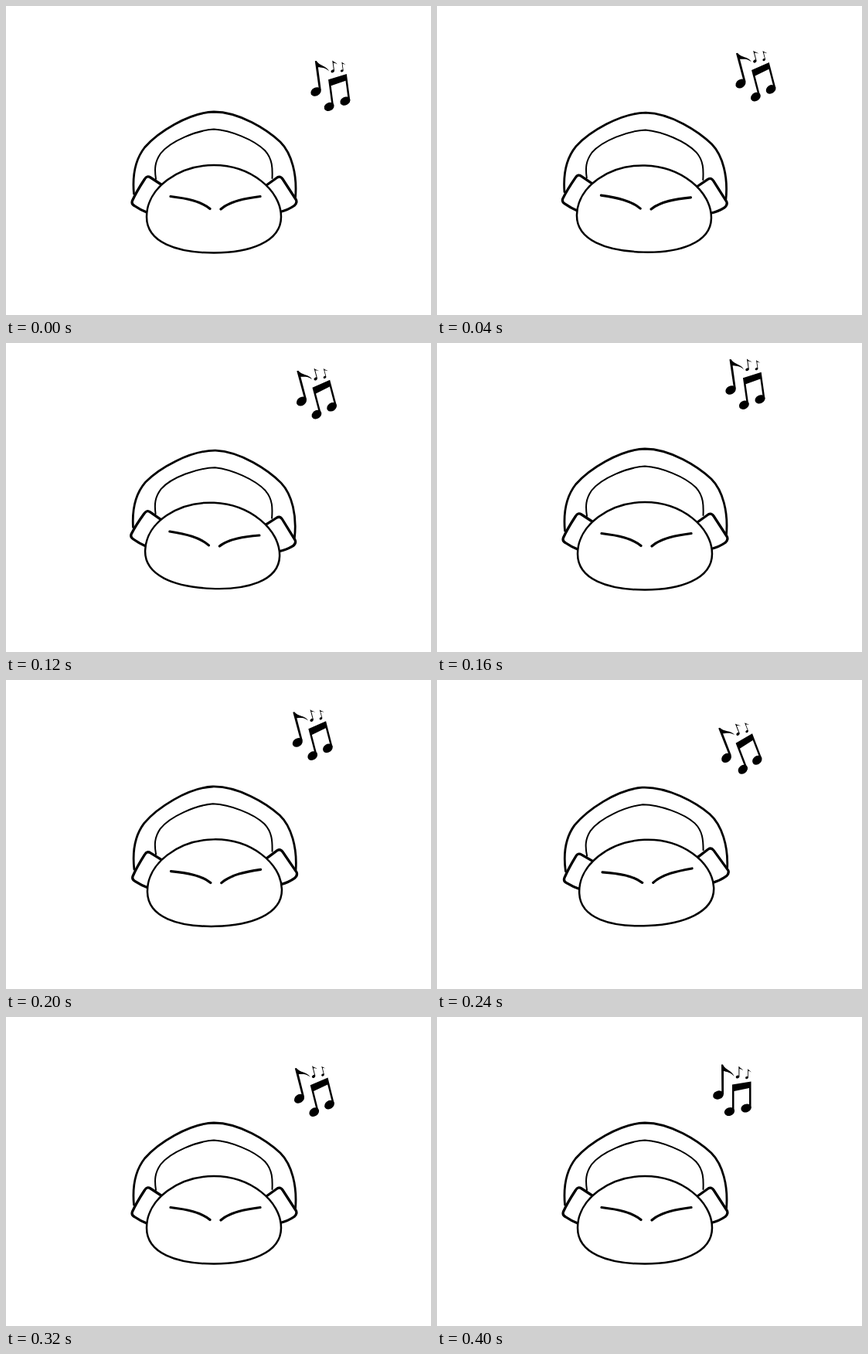
Animation, 550 px wide and 400 px high, one loop 440 ms. Source, as an HTML page:

```html
<!DOCTYPE html>
<html lang="en">
<head>
<meta charset="utf-8">
<title>Headphones</title>
<style>
  html, body { margin: 0; width: 100%; height: 100%; overflow: hidden; background: #fff; }
  svg { display: block; width: 550px; height: 400px; }
  #head path { fill: #fff; stroke: #000; stroke-linecap: round; stroke-linejoin: round; }
  #head .line { fill: none; }
</style>
</head>
<body>
<svg viewBox="0 0 550 400">
  <g id="head">
    <path class="line" stroke-width="2.8" d="M165.500 243C163.500 221 167 199 179.500 183C196 164 236 138 269 137C302 137 338 160 355 176C370 191 377 219 374.500 248"/>
    <path class="line" stroke-width="2" d="M194 224C192 211 192.500 202 200 191C213 174.500 247 161 269 159.500C291 161 321 173 335 187C345 198 345 210 344.500 223"/>
    <path stroke-width="3.300" d="M203 232.500L187 222Q182.500 219 179.500 224Q169 240 163.500 252Q162 256 166 258.500Q174 264 183 267.500"/>
    <path stroke-width="3.300" d="M337 232L351 222Q355 219.500 358 224L375.500 251Q377 255 373 258.500Q365 264 355 266.500"/>
    <path stroke-width="2.500" d="M182 273C182 235 224 206 269 206C316 206 356 238 356 273C356 306 314 319.500 269 319.500C221 319.500 182 306 182 273Z"/>
    <path class="line" stroke-width="3.200" d="M213 246.500C234 249 252 252.500 264 262.500M278 263C290 252.500 310 249 329 246.500"/>
  </g>
  <g id="notes">
    <g id="single">
      <ellipse rx="7" ry="5.400" transform="rotate(-20)"/>
      <path d="M4 -39.500L6 -39.500C9 -32 18 -32 20.500 -24C16 -30 10 -30 7 -31L7 -1L4.300 -1Z"/>
    </g>
    <ellipse rx="6.800" ry="5.300" transform="translate(14.500 21.500) rotate(-20)"/>
    <ellipse rx="6.800" ry="5.300" transform="translate(36 17) rotate(-20)"/>
    <path d="M18 -13.500L42.500 -17.500L42.500 17L40 17L40 -9L20.500 -5L20.500 21L18 21Z"/>
    <use href="#single" transform="translate(25 -23.500) scale(.34)"/>
    <use href="#single" transform="translate(37 -22.500) scale(.28)"/>
  </g>
</svg>
<script>
  const STEP = 40, COUNT = 11;

  // Positive sway uses tipLeft, negative uses tipRight.
  const sway = [0, .33, 1, .6, 0, -.45, -1, -.55, 0, 0, 0];
  const tipLeft = { b: .072, c: -.05, d: -.035, x: -1.8 };
  const tipRight = { b: -.043, c: .042, d: -.02, x: 1 };

  // x, y, angle at every second step
  const path = [
    [401, 111, -7.5], [385, 90, -21.5], [380, 61, -8],
    [374.6, 100.8, -21], [379.5, 105.8, -14], [364, 101, 0]
  ];

  const head = document.getElementById("head");
  const notes = document.getElementById("notes");

  function headPose(s) {
    const m = s < 0 ? tipRight : tipLeft, k = Math.abs(s);
    return `translate(${270 + m.x * k} 245) ` +
      `matrix(1 ${m.b * k} ${m.c * k} ${1 + m.d * k} 0 0) translate(-270 -245)`;
  }

  function notesPose(step) {
    const i = step >> 1, from = path[i], to = path[i + 1] || from;
    const [x, y, angle] = from.map((v, n) => v + (to[n] - v) * (step % 2) / 2);
    return `translate(${x} ${y}) rotate(${angle})`;
  }

  function draw() {
    const step = Math.floor(performance.now() / STEP) % COUNT;
    head.setAttribute("transform", headPose(sway[step]));
    notes.setAttribute("transform", notesPose(step));
    requestAnimationFrame(draw);
  }
  draw();
</script>
</body>
</html>
```
